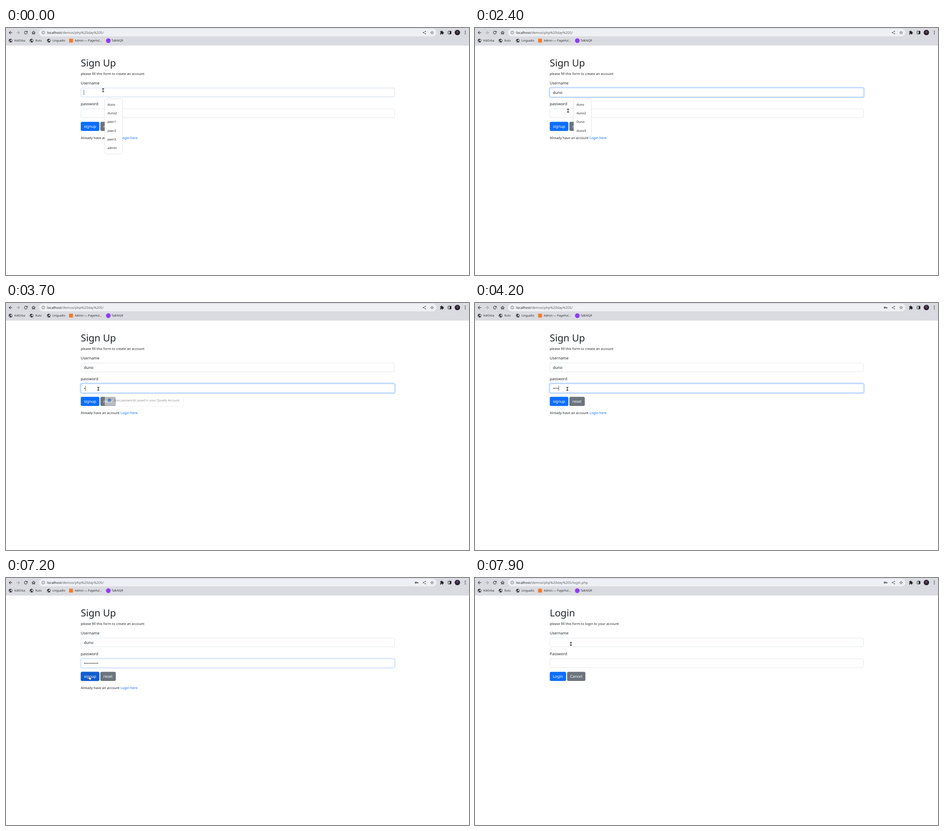
An HTML page for the animation above (8000 ms loop, 1025 by 547 pixels).

```html
<!DOCTYPE html>
<html lang="en">
<head>
<meta charset="utf-8">
<title>Sign Up</title>
<style>
  html, body { margin: 0; width: 100%; height: 100%; overflow: hidden; background: #fff; }
  svg { display: block; width: 100%; height: 100%; }
  text { font-family: "Noto Sans", "Open Sans", sans-serif; font-size: 8.54px; fill: #212529;
         text-rendering: geometricPrecision; white-space: pre; }
  .h1 { font-size: 21.36px; }
  .small { font-size: 7.5px; }
  .link { fill: #0d6efd; }
  .url { font-size: 7.55px; }
  .mark { font-size: 6.4px; fill: #2b2c30; }
  .item { font-size: 6.8px; fill: #222; }
  .btn text { fill: #fff; }
  .box { fill: #fff; stroke: #ced4da; stroke-width: .6; }
  .ring { fill: none; stroke: #0d6efd; stroke-opacity: .25; stroke-width: 2.13; }
  .pop { filter: drop-shadow(0 .5px 1px rgba(0, 0, 0, .25)); fill: #fff; }
  .cursor path { fill: none; }
</style>
</head>
<body>
<svg viewBox="0 0 1025 547" preserveAspectRatio="none">
  <rect width="1025" height="547" fill="#fff"/>

  <!-- browser bars -->
  <rect width="1025" height="38" fill="#dadbe0"/>
  <rect y="38" width="1025" height=".55" fill="#c6c7cc"/>
  <rect x="73" y="1.4" width="880" height="17.2" rx="8.6" fill="#eff0f3"/>
  <g id="icons"></g>
  <text class="url" x="91" y="12.9">localhost<tspan id="path" fill="#62656b"></tspan></text>
  <rect x="978.7" y="6.9" width="6.6" height="6.4" rx=".6" fill="none" stroke="#202124" stroke-width="1"/>
  <rect x="982.3" y="7" width="3" height="6.2" fill="#202124"/>
  <circle cx="999.3" cy="10" r="6" fill="#2a2030"/>
  <ellipse cx="999.3" cy="9" rx="2.6" ry="3" fill="#5b4458"/>
  <g fill="#202124">
    <circle cx="1016.7" cy="7" r=".9"/><circle cx="1016.7" cy="10.1" r=".9"/><circle cx="1016.7" cy="13.2" r=".9"/>
  </g>
  <rect x="139.7" y="23.7" width="8.6" height="8.6" rx="1" fill="#f27a2a"/>
  <circle cx="226.5" cy="28" r="5.2" fill="#8f3df0"/>
  <text class="mark" x="18" y="30.2">VidOrba</text>
  <text class="mark" x="65" y="30.2">Ruto</text>
  <text class="mark" x="103" y="30.2">Lingualto</text>
  <text class="mark" x="152.3" y="30.2">Admin — PageHul...</text>
  <text class="mark" x="233.6" y="30.2">TalkNQR</text>

  <!-- form -->
  <text id="title" class="h1" x="165.5" y="85.2"></text>
  <text id="intro" class="small" x="165.5" y="104"></text>
  <text x="165.5" y="125.2">Username</text>
  <text id="passLabel" x="165.5" y="171.3"></text>
  <rect id="nameRing" class="ring" x="164.4" y="131.5" width="697.2" height="22.4" rx="4.2"/>
  <rect id="nameBox" class="box" x="165.8" y="132.9" width="694.4" height="19.7" rx="3"/>
  <rect id="passRing" class="ring" x="164.4" y="177.6" width="697.2" height="22.4" rx="4.2"/>
  <rect id="passBox" class="box" x="165.8" y="179" width="694.4" height="19.7" rx="3"/>
  <text id="name" x="172.4" y="146.1"></text>
  <text id="pass" x="172.4" y="192.2"></text>
  <rect id="caret" width=".6" height="11.6" fill="#000"/>

  <g class="btn">
    <rect id="goRing" x="164.4" y="206.6" height="22.4" rx="4.2" fill="none" stroke="#3184fd" stroke-opacity=".5" stroke-width="2.13"/>
    <rect id="go" x="165.5" y="207.7" height="20.3" rx="3.2"/>
    <text id="goText" x="172.4" y="221.2"></text>
    <rect id="alt" y="207.7" height="20.3" rx="3.2" fill="#6c757d"/>
    <text id="altText" y="221.2"></text>
  </g>
  <text id="foot" class="small" x="165.5" y="246.4">Already have an account <tspan class="link">Login here</tspan></text>

  <!-- popups -->
  <g id="passPop">
    <path class="pop" d="M220.5 204H226l3-3.4 3 3.4h158.5q2 0 2 2v19.7q0 2-2 2h-170q-2 0-2-2V206q0-2 2-2z"/>
    <g id="passPopText">
      <circle cx="229" cy="215.6" r="4.2" fill="#4285f4"/>
      <text class="item" x="240" y="218">Use passwords saved in your Quvelo Account</text>
    </g>
  </g>
  <g id="list"><path id="listBox" class="pop"/><g id="items"></g></g>

  <!-- pointers -->
  <g id="beam" class="cursor">
    <path d="M-2.2-3.4h4.4M0-3.4v6.8M-2.2 3.4h4.4" stroke="#fff" stroke-width="2.2"/>
    <path d="M-2.2-3.4h4.4M0-3.4v6.8M-2.2 3.4h4.4" stroke="#111" stroke-width="1.1"/>
  </g>
  <g id="hand">
    <path d="M-.9.7a.9.9 0 0 1 1.8 0v2.4l3 .7q.9.3.8 1.2l-.6 3.2H.4l-2.9-3.1q.4-1.1 1.6-.3z" fill="#fff" stroke="#111" stroke-width=".6"/>
  </g>
</svg>

<script>
const $ = id => document.getElementById(id);
const NS = 'http://www.w3.org/2000/svg';
const LOOP = 8000;

const GLYPHS = {
  back: 'M20 11H7.83l5.59-5.59L12 4l-8 8 8 8 1.41-1.41L7.83 13H20v-2z',
  next: 'M12 4l-1.41 1.41L16.17 11H4v2h12.17l-5.58 5.59L12 20l8-8z',
  reload: 'M17.65 6.35C16.2 4.9 14.21 4 12 4c-4.42 0-7.99 3.58-7.99 8s3.57 8 7.99 8c3.73 0 6.84-2.55 7.73-6h-2.08c-.82 2.33-3.04 4-5.65 4-3.31 0-6-2.69-6-6s2.69-6 6-6c1.66 0 3.14.69 4.22 1.78L13 11h7V4l-2.35 2.35z',
  stop: 'M19 6.41L17.59 5 12 10.59 6.41 5 5 6.41 10.59 12 5 17.59 6.41 19 12 13.41 17.59 19 19 17.59 13.41 12z',
  home: 'M12 5.69l5 4.5V18h-2v-6H9v6H7v-7.81l5-4.5M12 3L2 12h3v8h6v-6h2v6h6v-8h3L12 3z',
  info: 'M11 7h2v2h-2zm0 4h2v6h-2zm1-9C6.48 2 2 6.48 2 12s4.48 10 10 10 10-4.48 10-10S17.52 2 12 2zm0 18c-4.41 0-8-3.59-8-8s3.59-8 8-8 8 3.59 8 8-3.59 8-8 8z',
  key: 'M12.65 10C11.83 7.67 9.61 6 7 6c-3.31 0-6 2.69-6 6s2.69 6 6 6c2.61 0 4.83-1.67 5.65-4H17v4h4v-4h2v-4H12.65zM7 14c-1.1 0-2-.9-2-2s.9-2 2-2 2 .9 2 2-.9 2-2 2z',
  share: 'M18 16.08c-.76 0-1.44.3-1.96.77L8.91 12.7c.05-.23.09-.46.09-.7s-.04-.47-.09-.7l7.05-4.11c.54.5 1.25.81 2.04.81 1.66 0 3-1.34 3-3s-1.34-3-3-3-3 1.34-3 3c0 .24.04.47.09.7L8.04 9.81C7.5 9.31 6.79 9 6 9c-1.66 0-3 1.34-3 3s1.34 3 3 3c.79 0 1.5-.31 2.04-.81l7.12 4.16c-.05.21-.08.43-.08.65 0 1.61 1.31 2.92 2.92 2.92s2.92-1.31 2.92-2.92-1.31-2.92-2.92-2.92z',
  star: 'M22 9.24l-7.19-.62L12 2 9.19 8.63 2 9.24l5.46 4.73L5.82 21 12 17.27 18.18 21l-1.63-7.03L22 9.24zM12 15.4l-3.76 2.27 1-4.28-3.32-2.88 4.38-.38L12 6.1l1.71 4.04 4.38.38-3.32 2.88 1 4.28L12 15.4z',
  puzzle: 'M20.5 11H19V7c0-1.1-.9-2-2-2h-4V3.5C13 2.12 11.88 1 10.5 1S8 2.12 8 3.5V5H4c-1.1 0-2 .9-2 2v3.8h1.5c1.49 0 2.7 1.21 2.7 2.7s-1.21 2.7-2.7 2.7H2V20c0 1.1.9 2 2 2h3.8v-1.5c0-1.49 1.21-2.7 2.7-2.7s2.7 1.21 2.7 2.7V22H17c1.1 0 2-.9 2-2v-4h1.5c1.38 0 2.5-1.12 2.5-2.5S21.88 11 20.5 11z',
  globe: 'M12 2C6.48 2 2 6.48 2 12s4.48 10 10 10 10-4.48 10-10S17.52 2 12 2zm-1 17.93c-3.95-.49-7-3.85-7-7.93 0-.62.08-1.21.21-1.79L9 15v1c0 1.1.9 2 2 2v1.93zm6.9-2.54c-.26-.81-1-1.39-1.9-1.39h-1v-3c0-.55-.45-1-1-1H8v-2h2c.55 0 1-.45 1-1V7h2c1.1 0 2-.9 2-2v-.41c2.93 1.19 5 4.06 5 7.41 0 2.08-.8 3.97-2.1 5.39z'
};

function add(parent, tag, attrs) {
  const el = document.createElementNS(NS, tag);
  for (const k in attrs) el.setAttribute(k, attrs[k]);
  return parent.appendChild(el);
}

// Puts the centre of a 24-unit glyph at x, y.
function icon(glyph, x, y, k, fill = '#202124') {
  return add($('icons'), 'path', {
    d: GLYPHS[glyph], fill, transform: `matrix(${k} 0 0 ${k} ${x - 12 * k} ${y - 12 * k})`
  });
}

icon('back', 10, 10.2, .46);
icon('next', 27, 10.2, .46, '#96989d');
const reload = icon('reload', 44, 10.2, .46);
const stop = icon('stop', 44, 10.2, .46);
icon('home', 61, 10.2, .44);
icon('info', 82.6, 10.2, .36, '#4c4f54');
const key = icon('key', 909, 10.2, .36, '#4c4f54');
icon('share', 926.3, 10.2, .38, '#4c4f54');
icon('star', 943.3, 10.2, .4, '#4c4f54');
icon('puzzle', 965, 10.2, .4);
for (const x of [10, 56.5, 94.8]) icon('globe', x, 28, .41);

const LISTS = {
  all: ['duno', 'duno2', 'peer1', 'peer2', 'peer3', 'admin'],
  match: ['duno', 'duno2', 'Duno', 'duno3']
};

const PAGES = {
  signup: {
    path: '/demos/php%20day%205/', title: 'Sign Up', intro: 'please fill this form to create an account',
    label: 'password', go: ['signup', 41.2], alt: ['reset', 208.9, 34.2]
  },
  login: {
    path: '/demos/php%20day%205/login.php', title: 'Login', intro: 'please fill this form to login to your account',
    label: 'Password', go: ['Login', 36.2], alt: ['Cancel', 203.9, 40.5]
  }
};

// Each track is a list of [start, value]; a value holds until the next.
const TRACKS = {
  page: [[0, 'signup'], [7500, 'login']],
  loading: [[0, 0], [7300, 1], [7600, 0]],
  key: [[0, 0], [3800, 1]],
  name: [[0, 0], [1200, 1], [1300, 2], [1400, 3], [1600, 4], [7500, 0]],
  dots: [[0, 0], [3700, 1], [3800, 2], [3900, 3], [4200, 4], [4900, 5], [5100, 6],
         [5300, 7], [5600, 8], [5800, 9], [5900, 10], [7500, 0]],
  caret: [[0, 1], [700, 0], [1200, 1], [2200, 0], [2700, 1], [3300, 0], [3700, 1],
          [4800, 0], [4900, 1], [6500, 0], [6900, 1], [7200, 0]],
  nameRing: [[0, 0], [200, 1], [2700, 0]],
  nameEdge: [[0, '#a4bce4'], [200, '#86b7fe'], [2700, '#ced4da']],
  passRing: [[0, 0], [2700, 1], [7200, .4], [7300, 0]],
  passEdge: [[0, '#ced4da'], [2700, '#86b7fe'], [7200, '#98bdf4'], [7300, '#ced4da']],
  list: [[0, 'all'], [1200, 'match']],
  listAlpha: [[0, 1], [2700, .2], [2800, 0]],
  pop: [[0, 0], [2700, 1], [3700, .5], [3800, 0]],
  popText: [[0, .62], [2800, 1]],
  go: [[0, '#0d6efd'], [6800, '#0c64e5'], [6900, '#0b5ed7'], [7200, '#125dce'], [7300, '#0a58ca'],
       [7500, '#0b5ed7'], [7800, '#0d6efd']],
  goRing: [[0, 0], [7200, .2], [7300, 1], [7500, 0]],
  pointer: [[0, 'beam'], [6800, 'hand'], [7800, 'beam']],
  spot: [[0, [215, 137.8]], [2200, [214, 146]], [2300, [210, 165]], [2400, [206, 183]], [2500, [204.4, 190]],
         [6600, [203, 194]], [6700, [197, 204]], [6800, [188, 214]], [6900, [184.3, 217]],
         [7800, [203, 178]], [7900, [212.3, 146]]]
};

function at(track, t) {
  let value;
  for (const [start, v] of TRACKS[track]) if (t >= start) value = v;
  return value;
}

const set = (el, attr, v) => el.setAttribute(attr, v);
const write = (id, s) => { if ($(id).textContent !== s) $(id).textContent = s; };

function drawPage(page) {
  write('path', page.path);
  write('title', page.title);
  write('intro', page.intro);
  write('passLabel', page.label);
  const [goText, goWidth] = page.go, [altText, altX, altWidth] = page.alt;
  write('goText', goText);
  set($('go'), 'width', goWidth);
  set($('goRing'), 'width', goWidth + 2.2);
  write('altText', altText);
  set($('altText'), 'x', altX + 6.9);
  set($('alt'), 'x', altX);
  set($('alt'), 'width', altWidth);
}

let shownList;
function drawList(kind) {
  if (kind === shownList) return;
  shownList = kind;
  const rows = LISTS[kind], pitch = 19.32, body = rows.length * pitch + 1;
  set($('listBox'), 'd', `M220.5 157.2H226l3-3.4 3 3.4h23.3q2 0 2 2v${body}q0 2-2 2h-34.8q-2 0-2-2v${-body}q0-2 2-2z`);
  $('items').textContent = '';
  rows.forEach((s, i) => {
    add($('items'), 'text', { class: 'item', x: 224.8, y: 171.8 + i * pitch }).textContent = s;
  });
}

function draw(t) {
  const page = at('page', t);
  drawPage(PAGES[page]);
  set($('foot'), 'opacity', page === 'signup' ? 1 : 0);

  const loading = at('loading', t);
  set(reload, 'opacity', 1 - loading);
  set(stop, 'opacity', loading);
  set(key, 'opacity', at('key', t));

  write('name', 'duno'.slice(0, at('name', t)));
  write('pass', '•'.repeat(at('dots', t)));
  const inPass = t >= 2700;
  set($('caret'), 'x', 172.4 + $(inPass ? 'pass' : 'name').getComputedTextLength());
  set($('caret'), 'y', inPass ? 183.1 : 137);
  set($('caret'), 'opacity', at('caret', t));

  for (const id of ['nameRing', 'passRing', 'goRing']) set($(id), 'opacity', at(id, t));
  $('nameBox').style.stroke = at('nameEdge', t);
  $('passBox').style.stroke = at('passEdge', t);
  set($('go'), 'fill', at('go', t));

  drawList(at('list', t));
  set($('list'), 'opacity', at('listAlpha', t));
  set($('list'), 'transform', t >= 2700 ? 'matrix(1 0 0 1 .7 1.7)' : '');
  set($('passPop'), 'opacity', at('pop', t));
  set($('passPopText'), 'opacity', at('popText', t));

  const pointer = at('pointer', t), [x, y] = at('spot', t);
  for (const id of ['beam', 'hand']) {
    set($(id), 'opacity', id === pointer ? 1 : 0);
    set($(id), 'transform', `matrix(1 0 0 1 ${x} ${y})`);
  }
}

function tick() {
  draw(performance.now() % LOOP);
  requestAnimationFrame(tick);
}
tick();
</script>
</body>
</html>
```
